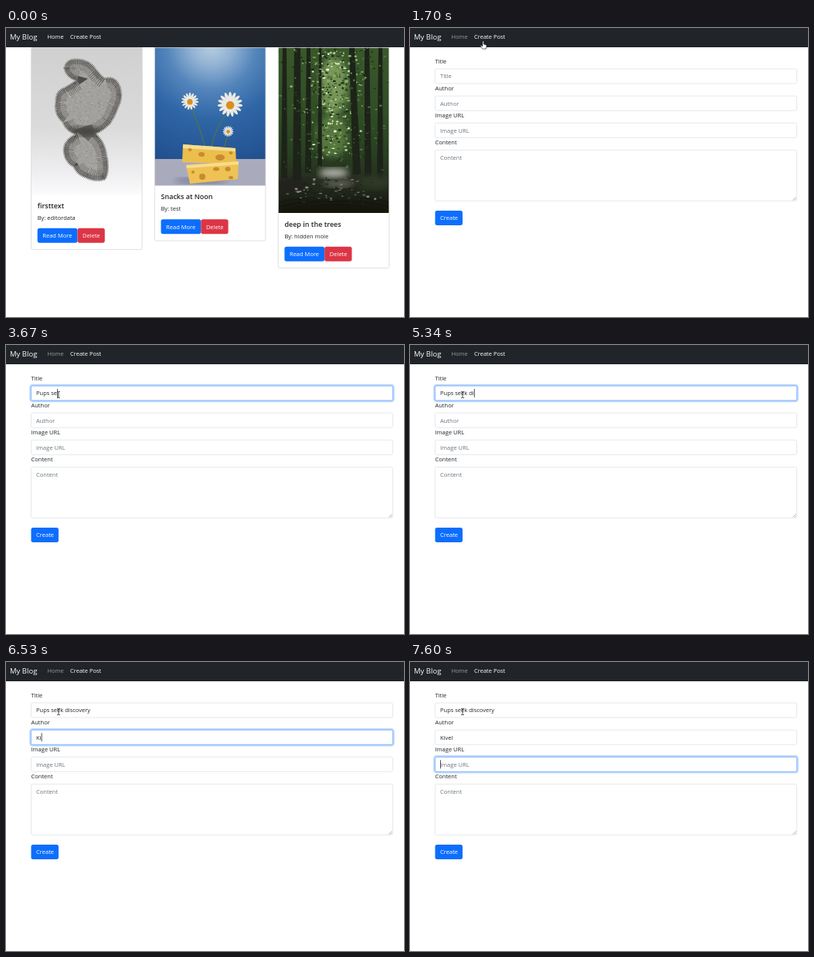
Recreate the animation shown at these times as an HTML page. Size 515 by 375 pixels, loop 8 s.

```html
<!DOCTYPE html>
<html lang="en">
<head>
<meta charset="utf-8">
<title>My Blog</title>
<style>
  html, body { margin: 0; height: 100%; overflow: hidden; background: #fff; }
  svg { display: block; width: 100vw; height: 100vh; }
  text { font: 7.53px "Open Sans", sans-serif; fill: #212529; white-space: pre; }
  .brand { font-size: 9.5px; fill: #fff; }
  .nav, .button { fill: #fff; }
  .heading { font-size: 9px; font-weight: 600; }
  .hint { fill: #6c757d; }
  .box { fill: #fff; stroke: #dfe3e7; stroke-width: .8; }
</style>
</head>
<body>
<svg id="stage" viewBox="0 0 515 375" preserveAspectRatio="none">
  <defs>
    <linearGradient id="studio" x2="0" y2="1">
      <stop stop-color="#d0d0d0"/><stop offset=".55" stop-color="#dbdbdb"/>
      <stop offset=".85" stop-color="#eeeef0"/><stop offset="1" stop-color="#fbfbfc"/>
    </linearGradient>
    <radialGradient id="wall" gradientUnits="userSpaceOnUse" cx="266" cy="22" r="160">
      <stop stop-color="#b9cee1"/><stop offset=".16" stop-color="#94b4d4"/>
      <stop offset=".36" stop-color="#5485bb"/><stop offset=".6" stop-color="#2f66a6"/>
      <stop offset="1" stop-color="#22508f"/>
    </radialGradient>
    <linearGradient id="wood" x2="0" y2="1">
      <stop stop-color="#3a582b"/><stop offset=".4" stop-color="#304d26"/>
      <stop offset=".65" stop-color="#283f21"/><stop offset=".8" stop-color="#272d20"/>
      <stop offset="1" stop-color="#14170f"/>
    </linearGradient>
    <filter id="soft"><feGaussianBlur stdDeviation="4"/></filter>
    <clipPath id="woodClip"><rect x="352.5" y="25.5" width="143" height="214.5"/></clipPath>
    <path id="coralShape" d="M76 52Q78 40 93 41Q108 42 116 54Q122 62 128 66Q140 62 146 74Q152 88 145 102Q140 116 134 124Q124 134 115 137Q128 148 130 166Q134 186 128 196Q116 200 104 194Q92 190 88 180Q76 174 75 158Q76 144 92 138Q78 134 74 122Q62 112 65 96Q64 82 76 78Q86 72 92 68Q78 64 76 52Z"/>
    <clipPath id="coralClip"><use href="#coralShape"/></clipPath>
  </defs>
  <g id="home"></g>
  <g id="form"></g>
  <rect width="515" height="25" fill="#212529"/>
  <text class="brand" x="5" y="15">My Blog</text>
  <text class="nav" id="homeLink" x="53.5" y="14">Home</text>
  <text class="nav" x="83" y="14">Create Post</text>
  <circle id="click" cx="94" cy="17" r="5.8" fill="#d8c01c" opacity=".8"/>
  <g id="arrow"><path d="M0 0V9.5L2.2 7.5 3.7 10.8 5.2 10.1 3.8 7H6.8Z" fill="#fff" stroke="#111" stroke-width=".7"/></g>
  <path id="hand" d="M94 17.3q1-.8 1.6.2v3.6l2.4.6q1.2.4 1.1 1.7l-.7 3.7h-4.6l-2.5-3.5q-.2-1.3 1-.9l1.5 1.1z" fill="#fff" stroke="#111" stroke-width=".6"/>
  <path id="beam" d="M66 60.3q2 0 2 1v6.4q0 1-2 1M70 60.3q-2 0-2 1M68 67.7q0 1 2 1" fill="none" stroke="#222" stroke-width=".8"/>
</svg>
<script>
const el = id => document.getElementById(id);

let seed = 11;
const rand = () => (seed = seed * 16807 % 2147483647) / 2147483647;
const between = (a, b) => a + (b - a) * rand();
const repeat = (n, draw) => Array.from({ length: n }, (_, i) => draw(i)).join('');
const ellipse = (x, y, a, b, style = '') =>
  `<ellipse cx="${x.toFixed(1)}" cy="${y.toFixed(1)}" rx="${a.toFixed(1)}" ry="${b.toFixed(1)}" ${style}/>`;
const glow = (x, y, a, b, color, opacity) =>
  ellipse(x, y, a, b, `fill="${color}" opacity="${opacity}" filter="url(#soft)"`);
const label = (x, y, words, kind = '') => `<text class="${kind}" x="${x}" y="${y}">${words}</text>`;
const button = (x, y, w, words, color) =>
  `<rect x="${x}" y="${y}" width="${w}" height="19" rx="2.6" fill="${color}"/>` +
  label(x + 6.6, y + 12.4, words, 'button');

// Finely dashed thick strokes give hairs at right angles to the outline.
function coral() {
  const hairs = (width, dash, color) =>
    `<use href="#coralShape" fill="none" stroke="${color}" stroke-width="${width}" stroke-dasharray="${dash}"/>`;
  const specks = color => `<path d="${repeat(420, () =>
    `M${between(65, 147).toFixed(1)} ${between(42, 197).toFixed(1)}l${between(-1, 1).toFixed(1)} 1.2`)}" stroke="${color}" stroke-width=".7"/>`;
  return `<rect x="33" y="25" width="143.5" height="191" fill="url(#studio)"/>
    <g clip-path="url(#coralClip)">
      <use href="#coralShape" fill="#a3a19d"/>
      ${specks('#777470')}${specks('#c4c2be')}
      ${hairs(26, '.7 1.5', '#6b6865')}${hairs(12, '.8 1.2', '#4e4c4a')}
      ${glow(104, 134, 20, 6, '#33312f', .7)}
    </g>${hairs(3, '.8 1.2', '#5a5855')}`;
}

function daisy(x, y, r) {
  const petals = repeat(15, i =>
    ellipse(x, y - r * .62, r * .13, r * .4, `transform="rotate(${i * 24} ${x} ${y})"`));
  return `<g fill="#ebeae6">${petals}</g>` + ellipse(x, y + r * .08, r * .33, r * .33, 'fill="#d98f1c"');
}

function cheese() {
  return `<rect x="192.5" y="25" width="143.5" height="146" fill="url(#wall)"/>
    <rect x="192.5" y="170" width="143.5" height="34.5" fill="#a9abbd"/>
    ${glow(252, 198, 35, 4, '#5e6485', .7)}
    <path d="M239 102Q250 125 257 153M287 110Q270 130 266 154M286 140L283 154" fill="none" stroke="#56783a" stroke-width="1.1"/>
    <path d="M229 151L297 156 298 177 228 174Z" fill="#ecbe4c"/>
    <path d="M229 151L297 156 297 160 229 156Z" fill="#f6dd90"/>
    <path d="M233 178L301 173 300 196 238 202Z" fill="#eec255"/>
    <path d="M233 178L301 173 301 177 234 182Z" fill="#f7dd8c"/>
    <g fill="#c98a30">${ellipse(253, 164, 4, 3)}${ellipse(277, 168, 6, 4)}${ellipse(238, 158, 2.5, 2)}${ellipse(291, 162, 2.5, 2)}
      ${ellipse(254, 193, 4, 4)}${ellipse(272, 183, 4, 2.5)}${ellipse(287, 183, 3.5, 3)}${ellipse(242, 187, 2, 2)}${ellipse(291, 194, 3, 2)}</g>
    ${daisy(238, 95, 11)}${daisy(290, 99, 16)}${daisy(287.5, 134, 7)}`;
}

function forest() {
  // Averaged random places crowd the dabs towards the clearing.
  const leaves = (n, spread, top, bottom, colors) => repeat(n, i => {
    const x = 424 + spread * (rand() + rand() - 1);
    return ellipse(x, between(top, bottom), between(.6, 2.4), between(.4, 1.5), `fill="${colors[i % colors.length]}"`);
  });
  const trunk = (x, w, end, lean = 1) =>
    `<path d="M${x} 25h${w}l${lean} ${end - 25}h${-w - 3}z" fill="#1d2319"/>`;
  return `<g clip-path="url(#woodClip)">
    <rect x="352" y="25" width="144" height="215" fill="url(#wood)"/>
    ${glow(424, 75, 18, 38, '#8cab68', .75)}${glow(422, 140, 20, 28, '#66894a', .75)}
    ${leaves(240, 40, 30, 170, ['#294120', '#7fa557', '#c3dba0', '#4a6d34', '#edf5dc'])}
    ${trunk(358, 5, 195)}${trunk(373, 8, 198)}${trunk(389, 5, 188)}${trunk(405, 3, 180)}
    ${trunk(444, 7, 190, 8)}${trunk(464, 6, 193, 3)}${trunk(482, 5, 198)}
    ${leaves(260, 78, 25, 110, ['#1b2a16', '#4f7838', '#324d26', '#8fb069', '#22351b'])}
    ${leaves(130, 78, 110, 185, ['#1d2f18', '#4a6c34', '#2d4723'])}
    ${glow(370, 204, 22, 9, '#20241a', .9)}${glow(478, 200, 22, 10, '#2e3b26', .9)}
    ${glow(424, 188, 19, 6, '#cdccc4', .85)}${glow(430, 202, 20, 5, '#7d7c74', .7)}
    ${leaves(90, 65, 194, 228, ['#595950', '#1d2018', '#8a897f', '#2a2e24'])}
    ${glow(424, 237, 78, 14, '#15180f', .9)}</g>`;
}

function card(x, imageEnd, picture, title, author) {
  return picture +
    `<rect x="${x}" y="25.3" width="143.6" height="${imageEnd + 46.2}" rx="2" fill="none" stroke="#d9d9d9" stroke-width=".8"/>` +
    label(x + 8.2, imageEnd + 17.7, title, 'heading') +
    label(x + 8.2, imageEnd + 32.8, 'By: ' + author) +
    button(x + 8.2, imageEnd + 43.7, 51.7, 'Read More', '#0d6efd') +
    button(x + 60, imageEnd + 43.7, 35.3, 'Delete', '#dc3545');
}

const fieldTop = { Title: 53, Author: 88.2, Image: 123.3, Content: 158.4 };

function field(name, hint = name, height = 19) {
  const y = fieldTop[name];
  const box = (grow, style) =>
    `<rect x="${32.5 - grow}" y="${y - grow}" width="${468 + 2 * grow}" height="${height + 2 * grow}" rx="${2 + grow}" ${style}/>`;
  return label(32.5, y - 7, hint) + box(0, 'class="box"') +
    `<g id="ring${name}" opacity="0">${box(1.2, 'fill="none" stroke="#0d6efd" stroke-opacity=".27" stroke-width="2.2"')}
      ${box(0, 'fill="none" stroke="#86b7fe" stroke-width=".9"')}</g>` +
    `<text id="text${name}" x="39" y="${y + 12.4}" class="hint">${hint}</text>`;
}

el('home').innerHTML =
  card(32.5, 216, coral(), 'firsttext', 'editordata') +
  card(192.3, 204.5, cheese(), 'Snacks at Noon', 'test') +
  card(352.2, 240, forest(), 'deep in the trees', 'hidden mole');

el('form').innerHTML =
  field('Title') + field('Author') + field('Image', 'Image URL') + field('Content', 'Content', 66) +
  '<path d="M495.5 223.5l4-4M498 223.5l1.5-1.5" stroke="#777" stroke-width=".6"/>' +
  button(32.5, 237, 35.5, 'Create', '#0d6efd') +
  '<rect id="caret" width=".8" height="11" fill="#212529"/>';

// Each key is [time, value]; a value holds until the next key.
const hold = (t, keys, value = 0) => {
  for (const [time, next] of keys) if (t >= time) value = next;
  return value;
};

const typed = {
  Title: { words: 'Pups seek discovery', keys: [[2610, 1], [2770, 2], [2930, 3], [3220, 4], [3520, 6],
    [3670, 7], [3820, 8], [3970, 9], [4430, 10], [5190, 11], [5340, 12], [5490, 13], [5640, 14],
    [5780, 15], [5930, 16], [6090, 18], [6230, 19]] },
  Author: { words: 'Kivel', keys: [[6530, 2], [6830, 3], [6990, 4], [7140, 5]] }
};
const focus = {
  Title: [[2160, .5], [2310, 1], [6530, 0]],
  Author: [[6530, 1], [7450, .5], [7600, 0]],
  Image: [[7450, .5], [7600, 1]]
};
const approach = [[200, 0], [350, .25], [500, .6], [650, .88], [810, 1]];

const show = (id, visible) => el(id).setAttribute('visibility', visible ? 'visible' : 'hidden');

function drawForm(t) {
  for (const name in focus) el('ring' + name).setAttribute('opacity', hold(t, focus[name]));
  for (const name in typed) {
    const { words, keys } = typed[name], count = hold(t, keys), text = el('text' + name);
    text.textContent = count ? words.slice(0, count) : name;
    text.setAttribute('class', count ? '' : 'hint');
  }
  const active = t < 6530 ? 'Title' : t < 7450 ? 'Author' : 'Image';
  const started = typed[active] && hold(t, typed[active].keys);
  const caret = el('caret');
  caret.setAttribute('x', 39.2 + (started ? el('text' + active).getComputedTextLength() : 0));
  caret.setAttribute('y', fieldTop[active] + 4);
  caret.setAttribute('opacity', t < 2310 || t >= 5040 && t < 5190 ? 0 : 1);
}

function draw(now) {
  const t = now % 8000, onForm = t >= 1700;
  el('home').style.display = onForm ? 'none' : '';
  el('form').style.display = onForm ? '' : 'none';
  el('homeLink').style.fill = onForm ? '#999b9d' : '#fff';

  const travel = hold(t, approach);
  el('arrow').setAttribute('transform', `translate(${77 + 17 * travel} ${58 - 41 * travel})`);
  show('arrow', t >= 200 && t < 810);
  show('hand', t >= 810 && t < 2160);
  show('click', t >= 1560 && t < 1700);
  show('beam', t >= 2160);

  if (onForm) drawForm(t);
  requestAnimationFrame(draw);
}
requestAnimationFrame(draw);
</script>
</body>
</html>
```
